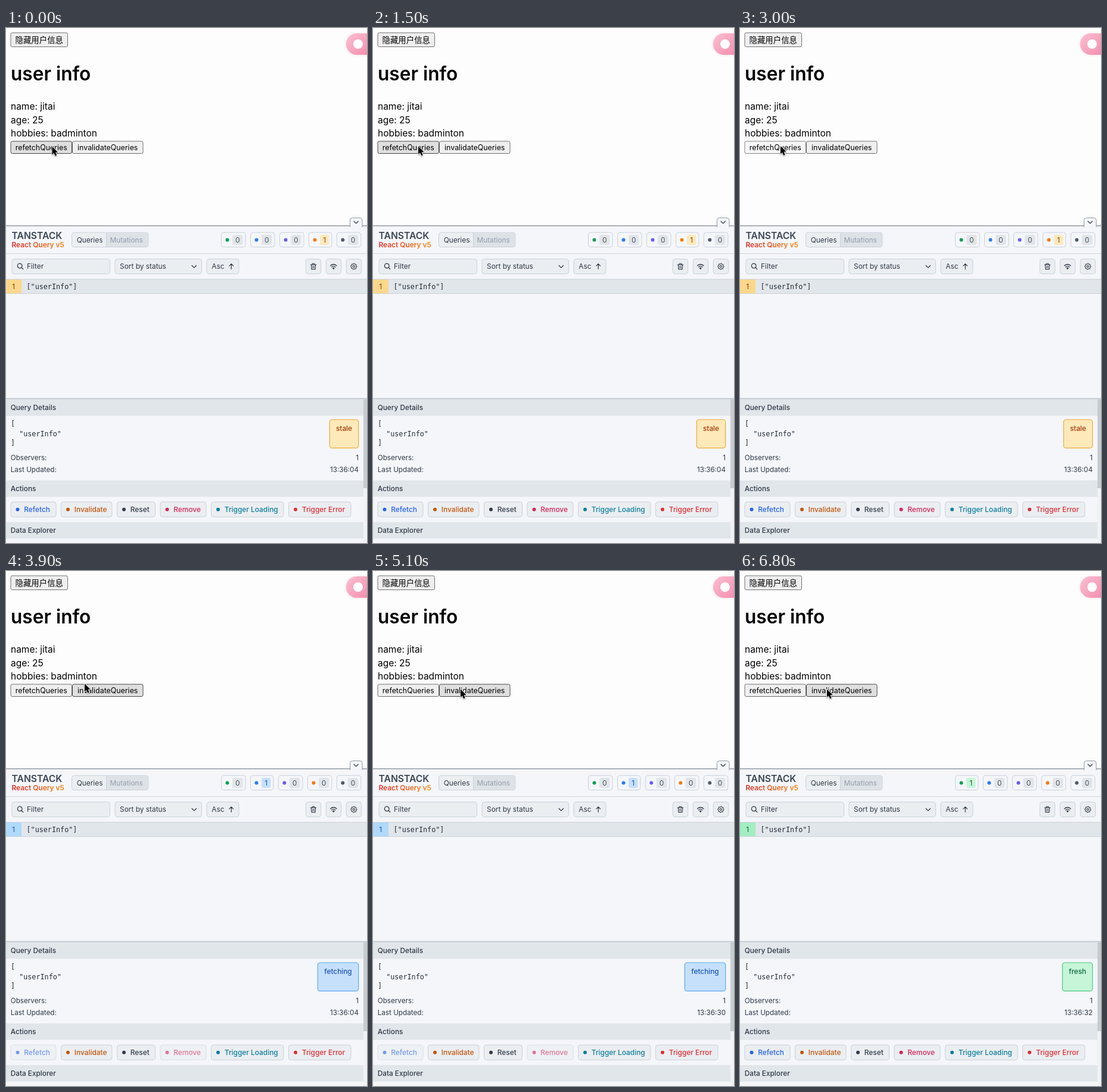
An HTML page with a canvas for the animation above (6.9 s loop, 606 px wide and 864 px high).

```html
<!DOCTYPE html>
<html lang="en">
<head>
<meta charset="utf-8">
<title>Query devtools</title>
<style>
html, body { margin: 0; width: 100%; height: 100%; overflow: hidden; background: #fdfdfd; }
canvas { display: block; width: 606px; height: 864px; }
</style>
</head>
<body>
<canvas id="stage"></canvas>
<script>
const W = 606, H = 864, LOOP = 6900, STEP = 100;
const canvas = document.getElementById("stage");
const ctx = canvas.getContext("2d");
const dpr = window.devicePixelRatio || 1;
canvas.width = W * dpr;
canvas.height = H * dpr;

const SANS = 'Inter, "Noto Sans CJK SC", "Noto Sans CJK", sans-serif';
const MONO = '"DejaVu Sans Mono", monospace';
const INK = "#303946", PANEL = "#f4f6fa", BAR = "#e1e6ea", EDGE = "#cbd1d8", FIELD = "#ebeef1";

const STATES = {
  fresh: { slot: 0, fill: "#c6f5d7", edge: "#48ca80", ink: "#0b6840", row: "#a3edc2", left: 541 },
  fetching: { slot: 1, fill: "#c6e0fc", edge: "#5aa9f2", ink: "#1a55bd", row: "#b0d9fc", left: 523 },
  stale: { slot: 3, fill: "#fde9b9", edge: "#e9aa3a", ink: "#a23a0c", row: "#fbd88c", left: 543 }
};
const DOTS = ["#12a150", "#2e7cf6", "#6a5cf0", "#f07d14", "#505b69"];
const ACTIONS = [
  ["Refetch", 8, 84, "#2563eb", true],
  ["Invalidate", 92.5, 178, "#c4560d"],
  ["Reset", 186.5, 250.5, "#323c4a"],
  ["Remove", 259, 336, "#d3275a", true],
  ["Trigger Loading", 344.5, 466, "#0e7f9f"],
  ["Trigger Error", 474.5, 579, "#de2f35"]
];

// [time, status, last updated]
const LOG = [
  [0, "stale", "13:36:04"],
  [3100, "fetching", "13:36:04"],
  [4100, "fresh", "13:36:30"],
  [5000, "fetching", "13:36:30"],
  [6100, "fresh", "13:36:32"]
];
// [time, x, y] of the pointer tip
const PATH = [
  [0, 77.5, 198.5], [900, 77.5, 198.5], [1400, 76, 198], [2100, 76, 198],
  [2700, 68, 197.5], [3200, 68, 197.5], [3800, 132, 188.5], [4000, 132, 188.5],
  [4500, 147, 198], [5300, 147, 198], [6000, 146, 198], [LOOP, 146, 198]
];
const within = (t, a, b) => t >= a && t < b;

function pointer(t) {
  let i = 0;
  while (i < PATH.length - 2 && PATH[i + 1][0] <= t) i++;
  const [t0, x0, y0] = PATH[i], [t1, x1, y1] = PATH[i + 1];
  const u = (t - t0) / (t1 - t0), k = u * u * (3 - 2 * u);
  return { x: x0 + (x1 - x0) * k, y: y0 + (y1 - y0) * k };
}

function rect(x0, y0, x1, y1, fill) {
  ctx.fillStyle = fill;
  ctx.fillRect(x0, y0, x1 - x0, y1 - y0);
}
function box(x0, y0, x1, y1, r, fill, edge, width = 1) {
  ctx.beginPath();
  ctx.roundRect(x0, y0, x1 - x0, y1 - y0, r);
  if (fill) { ctx.fillStyle = fill; ctx.fill(); }
  if (edge) { ctx.strokeStyle = edge; ctx.lineWidth = width; ctx.stroke(); }
}
function text(s, x, y, size = 11.9, color = INK, weight = 400, align = "left", family = SANS) {
  ctx.font = `${weight} ${size}px ${family}`;
  ctx.textAlign = align;
  ctx.fillStyle = color;
  ctx.fillText(s, x, y);
}
const mono = (s, x, y) => text(s, x, y, 11.75, "#242c37", 400, "left", MONO);
function dot(x, y, r, fill) {
  ctx.beginPath();
  ctx.arc(x, y, r, 0, 7);
  ctx.fillStyle = fill;
  ctx.fill();
}
function path(d, x, y, edge, width = 1.2, fill) {
  const p = new Path2D(d);
  ctx.save();
  ctx.translate(x, y);
  ctx.lineCap = ctx.lineJoin = "round";
  ctx.strokeStyle = edge;
  ctx.lineWidth = width;
  ctx.stroke(p);
  if (fill) { ctx.fillStyle = fill; ctx.fill(p); }
  ctx.restore();
}

function pageButton(label, x0, y0, x1, size, mode) {
  const look = {
    idle: ["#efefef", "#707070"],
    hover: ["#dfdfdf", "#484848"],
    active: ["#f6f6f6", "#858585"]
  }[mode];
  box(x0, y0, x1, y0 + (size > 13 ? 23.5 : 20.5), 2.5, ...look);
  text(label, (x0 + x1) / 2, y0 + (size > 13 ? 16.7 : 14.8), size, "#000", 400, "center");
}

function drawPage(t, p) {
  rect(0, 0, W, 332, "#fdfdfd");
  pageButton("隐藏用户信息", 8, 8, 103.5, 13.4, "idle");
  text("user info", 8, 87.5, 31.6, "#000", 600);
  text("name: jitai", 8, 137, 15.5, "#000");
  text("age: 25", 8, 159.5, 15.5, "#000");
  text("hobbies: badminton", 8, 182, 15.5, "#000");
  const onLeft = p.x < 111;
  pageButton("refetchQueries", 8, 190, 110.5, 12.4, !onLeft ? "idle" : within(t, 2900, 3100) ? "active" : "hover");
  pageButton("invalidateQueries", 111.5, 190, 230, 12.4, onLeft ? "idle" : within(t, 4800, 5000) ? "active" : "hover");

  const pink = ctx.createLinearGradient(571, 9, 606, 45);
  pink.addColorStop(0, "#fbc0d2");
  pink.addColorStop(1, "#f48fb0");
  ctx.save();
  ctx.shadowColor = "rgba(230,130,160,.3)";
  ctx.shadowBlur = 4;
  box(571, 9, 630, 45, 18, pink);
  ctx.restore();
  dot(591, 27, 8, "#fff");
}

function drawHeader(status) {
  rect(0, 331, W, H, PANEL);
  rect(0, 331, W, 332.5, "#959ca5");
  box(577.5, 318.5, 598, 334, [4, 4, 0, 0], PANEL, "#929aa4");
  rect(578, 332.5, 597.5, 335, PANEL);
  path("M-3.7-1.8L0 1.8L3.7-1.8", 587.7, 326, "#39424e", 1.3);

  text("TANSTACK", 9.5, 354, 15.7, "#3c4654", 600);
  const warm = ctx.createLinearGradient(9, 0, 98, 0);
  warm.addColorStop(0, "#e02c2c");
  warm.addColorStop(1, "#f78a14");
  text("React Query v5", 9.5, 368, 11.9, warm, 600);

  box(110.5, 343, 239, 367.5, 4, "#eceff2", EDGE);
  box(168.5, 343.5, 238.5, 367, [0, 4, 4, 0], "#dde2e7");
  rect(168, 343.5, 169, 367, EDGE);
  text("Queries", 118.7, 359.7, 11.9);
  text("Mutations", 174.5, 359.7, 11.8, "#939ca8");

  const state = STATES[status];
  let x = 361.5;
  DOTS.forEach((color, i) => {
    const on = i === state.slot, w = on ? 38.3 : 40.5;
    box(x, 343, x + w, 367.5, 4, PANEL, EDGE);
    dot(x + 10, 355.4, 3, color);
    box(x + 18.5, 347, x + w - 4.5, 364, 3, on ? state.fill : "#e1e5e9");
    text(on ? "1" : "0", x + (w + 14) / 2, 359.8, 12, on ? state.ink : "#47515e", 400, "center");
    x += w + 8.5;
  });
  rect(0, 378, W, 379, "#d0d5dc");
}

function drawFilters() {
  box(10, 387.5, 174.5, 412.5, 4, FIELD, EDGE);
  box(183, 387.5, 328.5, 412.5, 4, FIELD, EDGE);
  box(337, 387.5, 391, 412.5, 4, FIELD, EDGE);
  text("Filter", 35, 404.4);
  text("Sort by status", 191, 404.4);
  text("Asc", 345.3, 404.4);
  path("M3.5 0A3.8 3.8 0 1 1-4.1 0A3.8 3.8 0 1 1 3.5 0M2.5 2.9L5.2 5.5", 23.5, 399, INK, 1.3);
  path("M-3.7-1.8L0 1.8L3.7-1.8", 315.8, 400.3, INK, 1.3);
  path("M0 4.4V-4.2M-3.4-.9L0-4.4L3.4-.9", 378.2, 400, INK, 1.2);
  [503, 537, 571].forEach(x => box(x + .3, 387.5, x + 25.7, 412.5, 4, FIELD, EDGE));
  path("M-4.6-2.9H4.6M-1.8-3V-4.7H1.8V-3M-3.6-2.7L-3.1 4.6H3.1L3.6-2.7M-1.1-.4V2.3M1.1-.4V2.3", 516, 400, INK, 1.1);
  path("M-5.2-1.2Q0-5.8 5.2-1.2M-3.2 1Q0-1.8 3.2 1M-1.2 3Q0 2 1.2 3L0 4.2Z", 549.8, 400, INK, 1.3);
  let gear = "";
  for (let i = 0; i < 32; i++) {
    const a = i / 32 * Math.PI * 2, r = i % 4 < 2 ? 5 : 4.1;
    gear += `${i ? "L" : "M"}${r * Math.cos(a)} ${r * Math.sin(a)}`;
  }
  path(gear + "ZM1.7 0A1.7 1.7 0 1 1-1.7 0A1.7 1.7 0 1 1 1.7 0", 583.9, 400, INK, 1.05);
}

function section(label, y) {
  rect(0, y, 600, y + 27.5, BAR);
  text(label, 7.7, y + 18, 11.8, INK, 500);
}

function drawDetails(status, updated) {
  const state = STATES[status];
  rect(0, 421, W, 446, "#cdd3d9");
  rect(0, 422, W, 445, BAR);
  rect(0, 422, 26, 445, state.row);
  text("1", 12.7, 437.8, 11.9, state.ink, 400, "center");
  mono('["userInfo"]', 34.5, 437.5);

  rect(0, 620.8, W, 622.7, "#c2c8ce");
  rect(600, 622.5, W, H, "#f0f2f4");
  rect(600, 622.5, W, 772, "#c7ccd1");
  section("Query Details", 623);
  mono("[", 8, 668);
  mono('  "userInfo"', 8, 684.7);
  mono("]", 8, 700.3);
  box(state.left + .3, 657, 591.7, 704.7, 4, state.fill, state.edge, 1.2);
  text(status, (state.left + 592) / 2, 676, 11.8, state.ink, 500, "center");
  text("Observers:", 7.7, 725, 11.7);
  text("1", 592, 725, 11.7, INK, 400, "right");
  text("Last Updated:", 7.7, 745, 11.7);
  text(updated, 592, 745, 11.7, INK, 400, "right");

  section("Actions", 759);
  for (const [label, x0, x1, color, locks] of ACTIONS) {
    ctx.globalAlpha = locks && status === "fetching" ? .6 : 1;
    box(x0, 795, x1, 820.3, 4, FIELD, EDGE);
    dot(x0 + 11.5, 807.7, 3, color);
    text(label, x0 + 22.3, 812, 11.9, color, 500);
  }
  ctx.globalAlpha = 1;
  section("Data Explorer", 829);
}

function drawPointer(t, p) {
  if (within(t, 400, 1000)) {
    ctx.beginPath();
    ctx.arc(78, 199, 30.3, 0, 7);
    ctx.strokeStyle = "#111";
    ctx.lineWidth = 1.5;
    ctx.stroke();
    path("M-1.2 8.8V1.3Q-1.2-.2.2-.2T1.6 1.3V5.3Q3-1 .2 0M1.6 5.4Q3.8 3.7 4.3 6Q6.3 4.7 6.8 6.8Q9 6 9 8.2Q9 12 7.5 15H1Q0 13-3.6 9.2Q-4.3 7.2-2.5 7.6L-1.2 8.8Z",
      p.x + 1, p.y + .8, "#111", 1.6, "#fff");
    path("M1.7 10V13M4 10V13M6.2 10V13", p.x + 1, p.y + .8, "#333", .8);
    return;
  }
  ctx.save();
  ctx.shadowColor = "rgba(0,0,0,.3)";
  ctx.shadowBlur = 2;
  ctx.shadowOffsetY = 1;
  path("M0 0V13.2L3 10.4L5.2 15.5L7.6 14.5L5.4 9.5H9.6Z", p.x, p.y + .6, "#fff", 2, "#000");
  ctx.restore();
}

function frame(now) {
  const t = Math.floor((now % LOOP) / STEP) * STEP;
  const [, status, updated] = LOG.filter(e => e[0] <= t).pop();
  const p = pointer(t);
  ctx.setTransform(dpr, 0, 0, dpr, 0, 0);
  drawPage(t, p);
  drawHeader(status);
  drawFilters();
  drawDetails(status, updated);
  drawPointer(t, p);
}

const start = performance.now();
function tick() {
  frame(performance.now() - start);
  requestAnimationFrame(tick);
}
tick();
</script>
</body>
</html>
```
